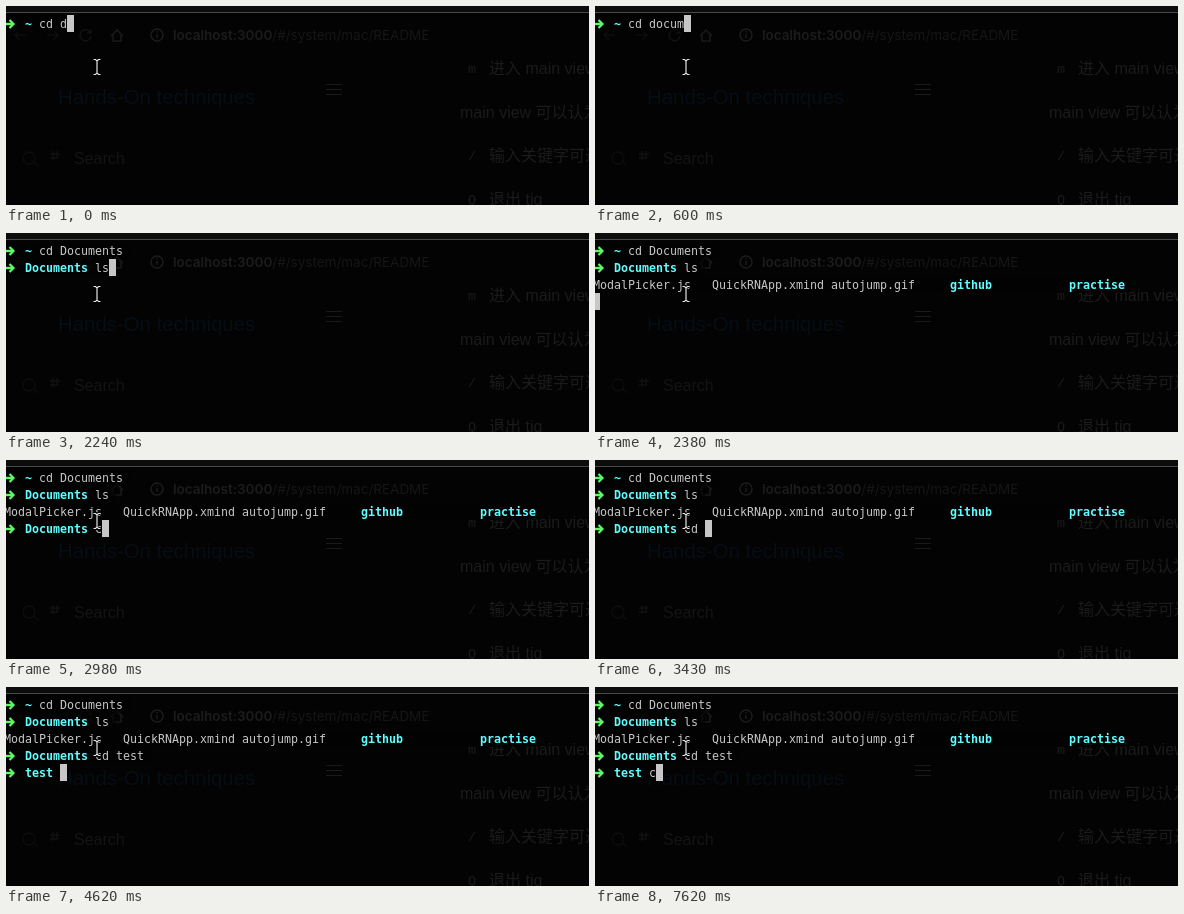
An HTML page with a canvas that plays this animation: 583 px wide and 199 px high, repeating every 8000 ms.

```html
<!DOCTYPE html>
<html lang="en">
<head>
<meta charset="utf-8">
<title>Terminal session</title>
<style>
  html, body { margin: 0; width: 100%; height: 100%; overflow: hidden; background: #030303; }
  canvas { display: block; }
</style>
</head>
<body>
<canvas id="stage" width="583" height="199"></canvas>
<script>
const ctx = document.getElementById('stage').getContext('2d');
const LOOP = 8000, CELL = 7, ROW = 17, LEFT = -2, TOP = 9;
const GREY = '#c7c7c7', CYAN = '#5ffdff', GREEN = '#5ff967';
const MONO = '11.63px "DejaVu Sans Mono", monospace';
const SANS = '"Liberation Sans", "Noto Sans CJK SC", sans-serif';

// Each prompt line: what has been typed from a given time on (null = prompt not shown yet).
const prompts = [
  { row: 0, dir: '~', typed: [[0, 'cd d'], [150, 'cd doc'], [300, 'cd docu'], [600, 'cd docum'],
    [740, 'cd documen'], [890, 'cd Documents/'], [1490, 'cd Documents']] },
  { row: 1, dir: 'Documents', typed: [[1490, ''], [2240, 'ls']] },
  { row: 3, dir: 'Documents', typed: [[2380, null], [2530, ''], [2980, 'c'], [3130, 'cd'], [3430, 'cd '],
    [3580, 'cd t'], [3730, 'cd te'], [3880, 'cd tes'], [4030, 'cd test']] },
  { row: 4, dir: 'test', typed: [[4620, ''], [7620, 'c']] }
];
const LISTING_AT = 2380;
const files = ['ModalPicker.js', 'QuickRNApp.xmind', 'autojump.gif', 'github', 'practise'];

const colX = col => LEFT + col * CELL;
const rowY = row => TOP + row * ROW;

function text(str, x, y, color, font) {
  ctx.font = font;
  ctx.fillStyle = color;
  ctx.fillText(str, x, y);
  return x + ctx.measureText(str).width;
}

function print(str, col, row, color = GREY, weight = '') {
  text(str, colX(col), rowY(row) + 13, color, weight + MONO);
}

function stroke(path, color, width = 1) {
  ctx.strokeStyle = color;
  ctx.lineWidth = width;
  ctx.stroke(new Path2D(path));
}

// The browser page that shines faintly through the terminal.
function drawPage() {
  ctx.fillStyle = '#030303';
  ctx.fillRect(0, 0, 583, 199);
  ctx.fillStyle = '#0c0c0c';
  ctx.fillRect(0, 0, 583, 6);
  ctx.fillStyle = '#484848';
  ctx.fillRect(0, 6, 583, 1);

  stroke('M20 29H9m5-5l-5 5 5 5M41 29h11m-5-5l5 5-5 5', '#0d0d0d', 1.5);
  stroke('M84 26a5.5 5.5 0 1 0 1 4M85 23v4h-4', '#121212', 1.5);
  stroke('M105 30l6-6 6 6M107 29v6h8v-6', '#191919', 1.6);
  stroke('M145 29a6 6 0 1 0 12 0a6 6 0 1 0-12 0M151 28v4M151 25v1.5', '#1c1c1c', 1.5);
  const url = '13.5px Inter, sans-serif';
  const end = text('localhost:3000', 167, 34, '#1c1c1c', '600 ' + url);
  text('/#/system/mac/README', end, 34, '#161616', url);

  text('Hands-On techniques', 52, 98, '#060d15', '20.4px ' + SANS);
  stroke('M320 78.5h16M320 83.5h16M320 88.5h16', '#1a1a1a');
  stroke('M17 152a6 6 0 1 0 12 0a6 6 0 1 0-12 0M28 156l4 4', '#0d0d0d', 1.3);
  stroke('M44 148h10M44 152h8M47 145v9M51 145v7', '#121212', 1.3);
  text('Search', 68, 158, '#141414', '16px ' + SANS);

  const body = '16px ' + SANS, key = '13.5px "Liberation Mono", monospace';
  [['m', '进入 main view', 68], ['/', '输入关键字可过滤', 155], ['Q', '退出 tig', 199]].forEach(([k, label, y]) => {
    text(k, 462, y - 1, '#1b1b1b', key);
    text(label, 483, y, '#1b1b1b', body);
  });
  text('main view 可以认为', 454, 112, '#1b1b1b', body);
}

// Printed cells hide most of the page behind them.
function shade(row, cols) {
  ctx.fillStyle = 'rgba(3,3,3,.6)';
  ctx.fillRect(0, rowY(row), colX(cols), ROW);
}

function drawArrow(row) {
  const y = rowY(row) + 9;
  stroke(`M0 ${y}h7`, GREEN, 2.4);
  stroke(`M3.5 ${y - 4}l4 4-4 4`, GREEN, 2.2);
}

function drawTerminal(t) {
  let cursor;
  if (t >= LISTING_AT) {
    shade(2, 76);
    files.forEach((name, i) => i < 3 ? print(name, i * 17, 2) : print(name, i * 17, 2, CYAN, 'bold '));
  }
  for (const { row, dir, typed } of prompts) {
    const step = typed.filter(([at]) => at <= t).pop();
    if (!step) break;
    const input = step[1];
    cursor = { row, col: 0 };
    if (input === null) continue;
    const start = 4 + dir.length;
    cursor.col = start + input.length;
    shade(row, cursor.col + 1);
    drawArrow(row);
    print(dir, 3, row, CYAN, 'bold ');
    print(input, start, row);
  }
  ctx.fillStyle = GREY;
  ctx.fillRect(colX(cursor.col), rowY(cursor.row), CELL, ROW);
}

function drawPointer() {
  const beam = 'M87.5 53.5h2l1.5 1.5 1.5-1.5h2M91 55v12M87.5 68.5h2l1.5-1.5 1.5 1.5h2';
  stroke(beam, '#000', 3);
  stroke(beam, '#e6e6e6', 1.2);
}

function frame() {
  drawPage();
  drawTerminal(performance.now() % LOOP);
  drawPointer();
  requestAnimationFrame(frame);
}
frame();
</script>
</body>
</html>
```
